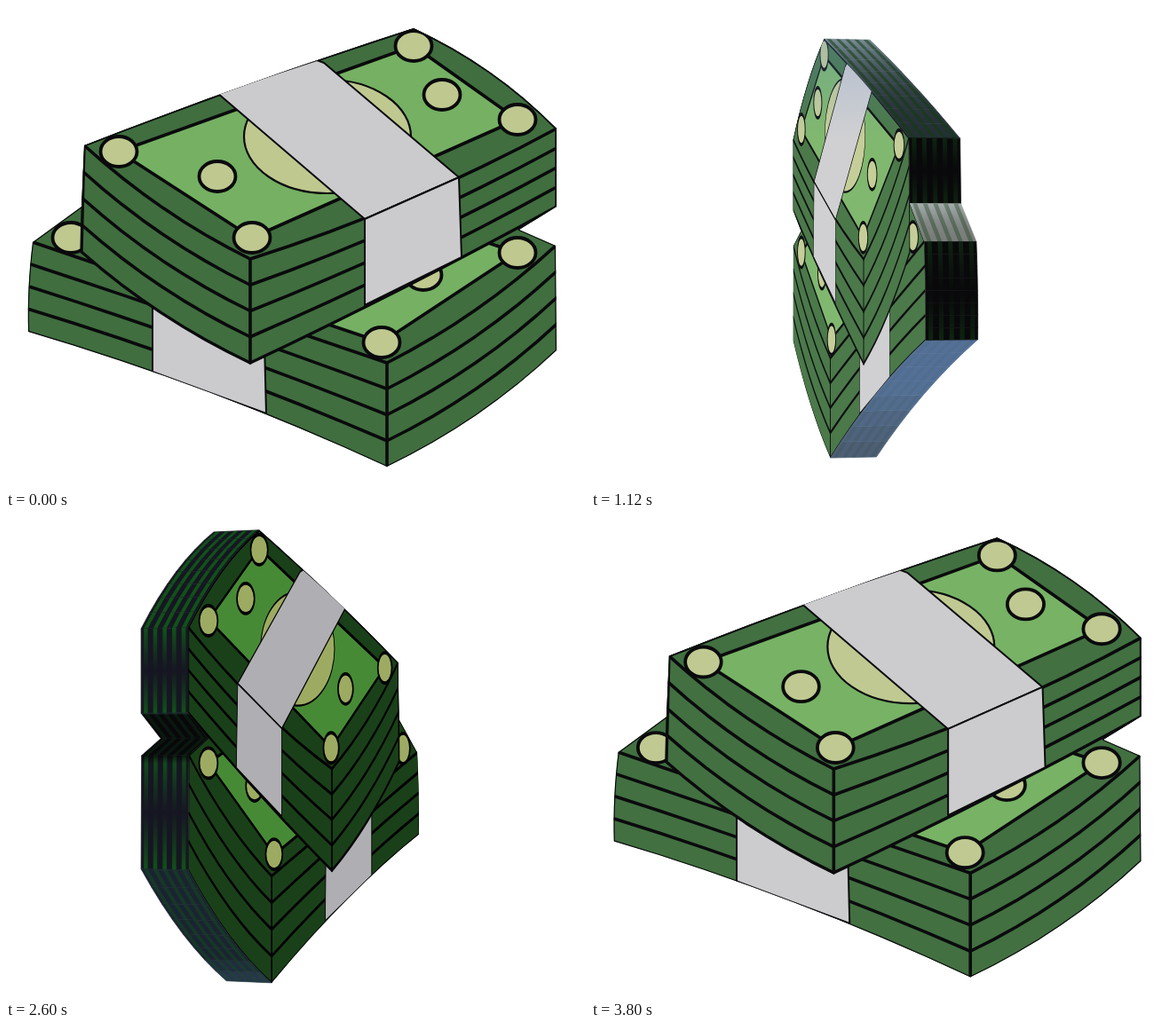
Recreate the animation shown at these times as an HTML page with a canvas. Size 652 by 543 pixels, loop 3.84 s.

```html
<!DOCTYPE html>
<html>
<head>
<meta charset="utf-8">
<style>
  html, body { margin: 0; width: 100%; height: 100%; overflow: hidden; background: #fff; }
  canvas { display: block; }
</style>
</head>
<body>
<canvas id="stage" width="652" height="543"></canvas>
<script>
const ctx = document.getElementById('stage').getContext('2d');
const LOOP = 3840, STEP = 40, CAMERA = 3000, HALF = 28, CX = 322, CY = 271.5;
const TONES = {
  dark: [64, 110, 63], light: [117, 176, 99], cream: [190, 200, 143], band: [203, 202, 205], ink: [10, 10, 12]
};

let cos, sin, capZ, palette;

const clamp = v => Math.max(0, Math.min(1, v));
const bell = v => Math.exp(-v * v);
const mix = (a, b, k) => a.map((v, i) => v + (b[i] - v) * k);
const rgba = (c, alpha = 1) => `rgba(${c.map(Math.round)},${alpha})`;

// Points from a to b, bulging to the left of the direction of travel.
function bow(a, b, bulge, count = 8) {
  const dx = b[0] - a[0], dy = b[1] - a[1], size = bulge * 4 / Math.hypot(dx, dy);
  return Array.from({ length: count + 1 }, (_, i) => {
    const t = i / count, out = size * t * (1 - t);
    return [a[0] + dx * t + dy * out, a[1] + dy * t - dx * out];
  });
}

// Stack corners: left, peak, right, centre; the last three again at the bottom.
const top1 = { left: [88, 157], peak: [459, 25], right: [620, 138], centre: [275, 285] };
const low1 = { left: [85, 277], right: [620, 226], centre: [275, 402] };
const top2 = { left: [30, 266], right: [619, 270], centre: [429, 402] };
const low2 = { left: [25, 367], right: [620, 388], centre: [429, 519] };

// Silhouette corners, clockwise, with the bulge of the edge that follows.
const edges = [
  [top1.peak, 9], [top1.right, 0], [low1.right, 0], [[578, 252], 0], [top2.right, 0], [low2.right, 9],
  [low2.centre, -8], [low2.left, 2], [top2.left, 0], [[85, 226], 0], [top1.left, 3]
].map(([from, bulge], i, all) => bow(from, all[(i + 1) % all.length][0], bulge, bulge ? 8 : 1));
const outline = edges.flatMap(points => points.slice(0, -1));
const upper = [
  ...edges[10], ...edges[0], ...bow(low1.right, low1.centre, 3), ...bow(low1.centre, low1.left, 8)
];

function spin(x, z) {
  return [x * cos + z * sin, z * cos - x * sin];
}

function project(x, y, z = capZ) {
  const [px, pz] = spin(x - CX, z);
  const scale = (CAMERA - HALF) / (CAMERA - pz);
  return [CX + px * scale, CY + (y - CY) * scale];
}

function addPath(points, closed = true) {
  points.forEach((p, i) => i ? ctx.lineTo(...p) : ctx.moveTo(...p));
  if (closed) ctx.closePath();
}

// The pen is squeezed with the turning face.
function ink(width) {
  ctx.save();
  ctx.setTransform(Math.max(Math.abs(cos), .1), 0, 0, 1, 0, 0);
  ctx.lineWidth = width;
  ctx.strokeStyle = palette.ink;
  ctx.lineJoin = ctx.lineCap = 'round';
  ctx.stroke();
  ctx.restore();
}

function shape(points, color, width) {
  ctx.beginPath();
  addPath(points.map(p => project(...p)));
  ctx.fillStyle = palette[color];
  ctx.fill();
  ink(width);
}

function line(points) {
  ctx.beginPath();
  addPath(points.map(p => project(...p)), false);
  ink(3.6);
}

function disc([x, y], rx = 20.5, ry = 17, width = 3.8) {
  const [left, py] = project(x - rx, y), [right] = project(x + rx, y);
  ctx.beginPath();
  ctx.ellipse((left + right) / 2, py, Math.abs(right - left) / 2, ry, 0, 0, 7);
  ctx.fillStyle = palette.cream;
  ctx.fill();
  ink(width);
}

function drawSides(top, low, bulges) {
  const [leftTop, leftLow, rightTop, rightLow] = bulges;
  for (let i = 0; i < 4; i++) {
    const t = i / 4, centre = mix(top.centre, low.centre, t);
    line(bow(centre, mix(top.left, low.left, t), leftTop + (leftLow - leftTop) * t));
    line(bow(mix(top.right, low.right, t), centre, rightTop + (rightLow - rightTop) * t));
  }
  line([top.centre, low.centre]);
}

function drawStacks() {
  const lowerPlate = [[73, 261], [423, 379], [576, 278], [226, 160]];
  drawSides(top2, low2, [0, -8, 8, 9]);
  shape(lowerPlate, 'light', 3.6);
  shape([[165, 300], [291, 380], [293, 459], [165, 412]], 'band', 2);
  [[470, 303], ...lowerPlate].forEach(p => disc(p));

  const plate = [[127, 164], [459, 45], [576, 128], [277, 261]];
  const fold = [[404, 240], [510, 193]];
  shape(upper, 'dark', 3.4);
  drawSides(top1, low1, [8, 8, 9, 3]);
  shape(plate, 'light', 3.6);
  disc([362, 147], 94, 64, 2.2);
  [[238, 192], [491, 100], ...plate].forEach(p => disc(p));
  shape([[238, 98], [350, 61], [358, 64], fold[1], fold[0]], 'band', 2);
  shape([...fold, [513, 283], [404, 337]], 'band', 2);
}

function glow(from, to, stops) {
  const fill = ctx.createLinearGradient(...from, ...to);
  stops.forEach((color, i) => fill.addColorStop(i / (stops.length - 1), color));
  return fill;
}

function drawGloss(tilt) {
  const x = 370 + (tilt + 41) * 8, y = 240;
  const shine = alpha => rgba([225, 255, 200], alpha), sky = alpha => rgba([90, 135, 195], alpha);
  ctx.fillStyle = glow([x - 42, y + 38], [x + 42, y - 38], [shine(0), shine(.36 * bell((tilt + 41) / 14)), shine(0)]);
  ctx.fillRect(0, 0, 652, 543);
  ctx.fillStyle = glow([0, 14], [0, 150], [sky(.3 * clamp((-tilt - 35) / 30)), sky(0)]);
  ctx.fillRect(0, 0, 652, 543);
}

// The light comes from the left: faces tilted there are brighter, the others dimmer.
function drawFace(tilt) {
  const lit = tilt > -41 ? -tilt / 41 : 1 + (tilt + 41) / 60;
  const gamma = tilt > 0 ? 1 + .65 * clamp(tilt / 64) : 1 - .27 * clamp(lit);
  palette = {};
  for (const name in TONES) palette[name] = rgba(TONES[name].map(v => 255 * (v / 255) ** gamma));
  ctx.save();
  ctx.beginPath();
  addPath(outline.map(p => project(...p)));
  ctx.clip();
  shape(outline, 'dark', 2.4);
  drawStacks();
  if (tilt < 0) drawGloss(tilt);
  ctx.restore();
}

function wallTones(nx, ny, t, y) {
  const facesLeft = nx * cos < 0, sheltered = nx > 0 && Math.abs(y - 250) < 24 && ny;
  let base = facesLeft ? [22, 22, 34] : [9, 9, 11];
  let stripe = facesLeft ? .9 : .55;
  if (sheltered) {
    base = [8, 8, 11];
    stripe = .2;
  } else if (Math.abs(ny) < .3) {
    const gleam = facesLeft && nx < 0 ? clamp(.75 * bell((y - 178) / 6) + .7 * bell((y - 224) / 3)) : 0;
    base = mix(base, [225, 225, 228], gleam);
    stripe *= Math.abs(2 * t - 1) * (1 - gleam);
  } else if (ny > 0) {
    const blue = clamp((ny - .86) / .08);
    base = facesLeft ? mix([26, 36, 48], [58, 80, 110], blue) : mix([66, 64, 57], [84, 112, 150], blue);
    stripe *= .4 - .3 * blue;
  } else if (!facesLeft) {
    const shine = .85 * clamp((.92 + ny) * 5);
    base = mix(mix([36, 48, 52], [120, 140, 148], t * t), [215, 210, 200], shine);
    stripe *= 1 - .7 * shine;
  }
  return [rgba(base), rgba(facesLeft ? [16, 88, 24] : [18, 58, 20], stripe)];
}

function visibleWalls() {
  const walls = [];
  for (const points of edges) {
    const count = points.length - 1;
    for (let i = 0; i < count; i++) {
      const a = points[i], b = points[i + 1];
      const length = Math.hypot(b[0] - a[0], b[1] - a[1]);
      const nx = (b[1] - a[1]) / length, ny = (a[0] - b[0]) / length;
      const [x, z] = spin(a[0] - CX, 0);
      const facing = -nx * cos * x - ny * (a[1] - CY) - nx * sin * (CAMERA - z);
      if (facing > 0) walls.push({ a, b, nx, ny, start: i / count, span: 1 / count, depth: z });
    }
  }
  return walls.sort((p, q) => p.depth - q.depth);
}

function drawWalls() {
  for (const { a, b, nx, ny, start, span } of visibleWalls()) {
    const quad = (z1, z2) => addPath([
      project(...a, z1), project(...b, z1), project(...b, z2), project(...a, z2)
    ]);
    const tones = Array.from({ length: 15 }, (_, i) => {
      const t = i / 14;
      return wallTones(nx, ny, start + span * t, a[1] + (b[1] - a[1]) * t);
    });
    const from = [0, project(...a, 0)[1]], to = [0, project(...b, 0)[1]];
    ctx.beginPath();
    quad(-HALF, HALF);
    ctx.fillStyle = ctx.strokeStyle = glow(from, to, tones.map(t => t[0]));
    ctx.lineWidth = .7;
    ctx.fill();
    ctx.stroke();
    ctx.beginPath();
    for (let s = -2; s <= 2; s++) quad(s * 11.2 - 2.4, s * 11.2 + 2.4);
    ctx.fillStyle = glow(from, to, tones.map(t => t[1]));
    ctx.fill();
  }
}

function draw(time) {
  const angle = Math.floor(time % LOOP / STEP) * STEP / LOOP * 360;
  cos = Math.cos(angle * Math.PI / 180);
  sin = Math.sin(angle * Math.PI / 180);
  ctx.clearRect(0, 0, 652, 543);
  drawWalls();
  // A face shows only while the camera is in front of its plane.
  if (Math.abs(cos) * CAMERA > HALF) {
    capZ = Math.sign(cos) * HALF;
    drawFace((angle + 90) % 180 - 90);
  }
}

const start = performance.now();
function tick() {
  draw(performance.now() - start);
  requestAnimationFrame(tick);
}
tick();
</script>
</body>
</html>
```
